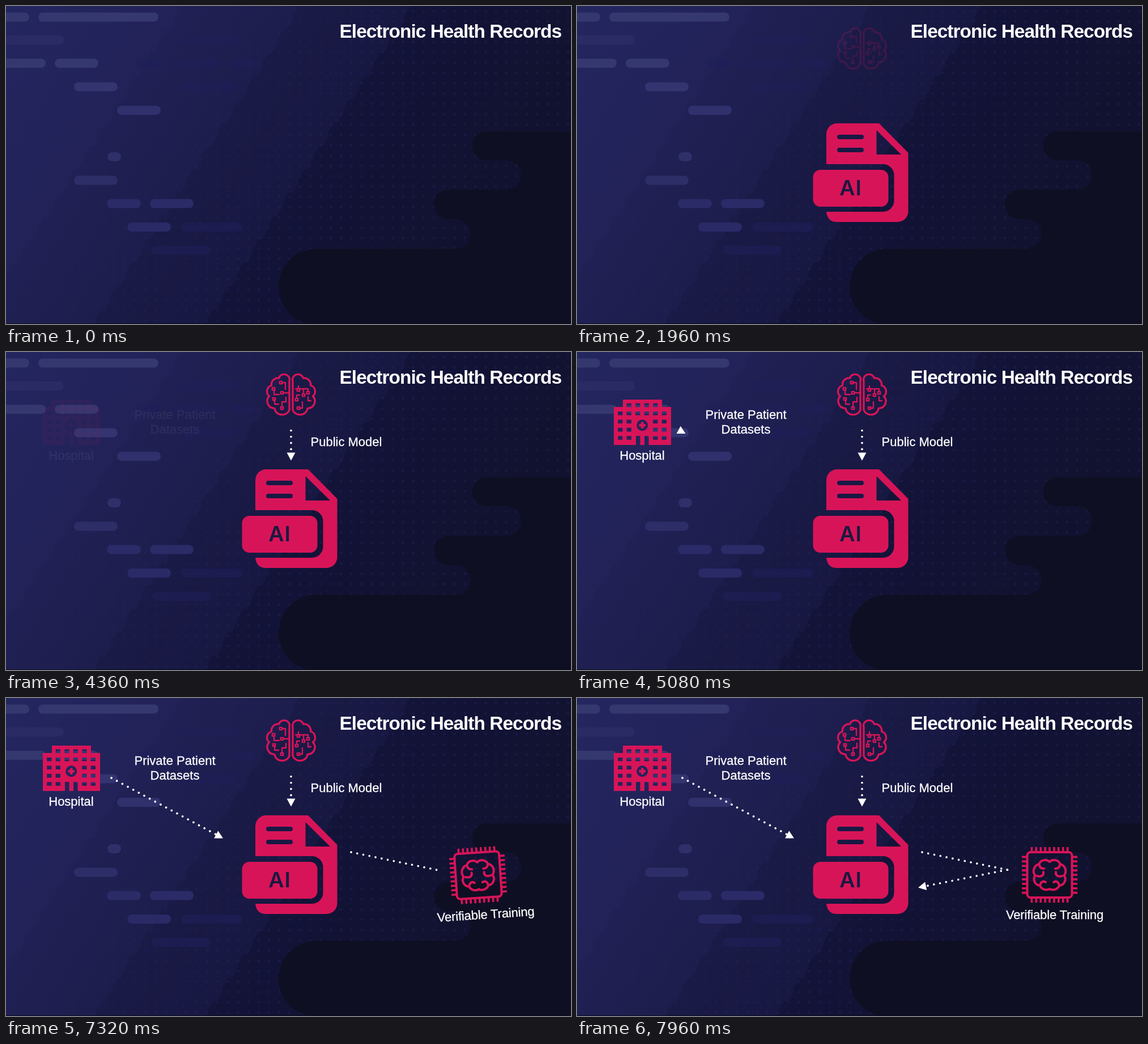
An HTML page that plays this animation: 997x561 px, repeating every 8000 ms.

```html
<!DOCTYPE html>
<html lang="en">
<head>
<meta charset="utf-8">
<title>Electronic Health Records</title>
<style>
  html, body { margin: 0; width: 100%; height: 100%; overflow: hidden; background: #14132f; }
  svg { display: block; width: 100%; height: 100%; }
  text { font-family: "Liberation Sans", Arial, sans-serif; fill: #fff; }
  .label { font-size: 22px; text-anchor: middle; stroke: #fff; stroke-width: .3px; }
  .title { font-size: 33.4px; font-weight: 700; letter-spacing: -.96px; }
  .badge { font: 600 37.5px Inter, sans-serif; fill: #1a1940; text-anchor: middle; letter-spacing: .8px; }
  .solid { fill: #d81458; fill-rule: evenodd; }
  .line { fill: none; stroke: #d81458; stroke-linecap: round; stroke-linejoin: round; }
  .arrow line { stroke: #fff; stroke-width: 3.7; stroke-linecap: round; }
  .arrow path { fill: #fff; }
</style>
</head>
<body>
<svg viewBox="0 0 997 561" preserveAspectRatio="none">
  <defs>
    <linearGradient id="sky" gradientUnits="userSpaceOnUse" x1="0" y1="0" x2="755" y2="490">
      <stop offset="0" stop-color="#242660"/>
      <stop offset=".3" stop-color="#222258"/>
      <stop offset="1" stop-color="#17183d"/>
    </linearGradient>
    <linearGradient id="fade" gradientUnits="userSpaceOnUse" x1="80" y1="50" x2="500" y2="325">
      <stop offset="0" stop-color="#000"/>
      <stop offset="1" stop-color="#fff"/>
    </linearGradient>
    <mask id="dotMask"><rect width="997" height="561" fill="url(#fade)"/></mask>
    <pattern id="dots" width="18.2" height="18.2" patternUnits="userSpaceOnUse">
      <circle cx="9" cy="9" r="2.3" fill="#2c2b68" opacity=".3"/>
    </pattern>
    <path id="lobe" d="M500 51A9.5 9 0 0 0 481.5 46A11.5 11.5 0 0 0 468.5 59A11 11 0 0 0 464.5 78A12.5 12.5 0 0 0 471.5 99L474 99.5A13.3 12 0 0 0 500 102Z"/>
    <path id="fold" d="M834 289A11 10 0 0 0 815.5 293A12.5 12.5 0 0 0 808.5 313A11.5 11.5 0 0 0 817 331A12 11 0 0 0 834 337M812 314C819 316 824 313 823 307M817 331C818 324 823 322 827 325M815.5 293C816 298 819 301 824 301"/>
  </defs>

  <rect width="997" height="561" fill="url(#sky)"/>
  <g id="bands" fill="#080818"></g>
  <rect width="997" height="561" fill="url(#dots)" mask="url(#dotMask)"/>
  <g id="pills"></g>
  <path fill="#0f0f23" d="M997 221H848a25.5 25.5 0 0 0 0 51H883a26 26 0 0 1 0 52H781a26 26 0 0 0 0 52H794a26 26 0 0 1 0 52H548a67 67 0 0 0 0 134H997Z"/>
  <rect y="560" width="997" height="1" fill="#0a0a1c"/>
  <text class="title" x="588.5" y="56">Electronic Health Records</text>

  <g id="file">
    <path class="solid" d="M440 279V226a19 19 0 0 1 19-19H533L584.5 259V362a19 19 0 0 1-19 19H459q-17 0-19-18H540a19.5 19.5 0 0 0 19.5-19.5V298.5A19.5 19.5 0 0 0 540 279ZM528.5 219V262H572ZM463 227h39a4 4 0 0 1 0 8h-39a4 4 0 0 1 0-8ZM463 250h39a4 4 0 0 1 0 8h-39a4 4 0 0 1 0-8Z"/>
    <rect class="solid" x="416.5" y="289" width="133" height="65" rx="13"/>
    <text class="badge" x="483" y="334">AI</text>
  </g>

  <g id="brain" class="line" stroke-width="3.3">
    <use href="#lobe"/>
    <use href="#lobe" transform="matrix(-1 0 0 1 1006 0)"/>
    <g id="circuit" stroke-width="2.3">
      <path d="M488 54H493V66M473 68V75H482M490 72H499M474 84V92H481M487 97V88H494V80M511 65H533V69M525 65V73M516 65V60M513 82V76H518M519 99H523V88M533 79V86H538"/>
    </g>
  </g>
  <text id="modelText" class="label" x="600.5" y="166">Public Model</text>

  <g id="hospital">
    <path id="building" class="solid"/>
    <path class="solid" d="M113 123.5h4.5v3.5h3.5v4.5h-3.5v3.5h-4.5v-3.5h-3.5v-4.5h3.5Z"/>
    <text class="label" x="115" y="190">Hospital</text>
    <text class="label" x="298" y="118">Private Patient</text>
    <text class="label" x="298" y="143.5">Datasets</text>
  </g>

  <g id="chip">
    <g class="line" stroke-width="4">
      <rect x="794.5" y="272" width="79" height="80" rx="6"/>
      <path id="pins" stroke-width="3.6" stroke-linecap="butt"/>
      <use href="#fold"/>
      <use href="#fold" transform="matrix(-1 0 0 1 1668 0)"/>
    </g>
    <text class="label" x="843" y="389.5" letter-spacing="-.15">Verifiable Training</text>
  </g>
  <g id="arrows"></g>
</svg>
<script>
const LOOP = 8000;
const $ = id => document.getElementById(id);
const add = (parent, name, attrs) => {
  const el = document.createElementNS("http://www.w3.org/2000/svg", name);
  for (const key in attrs) el.setAttribute(key, attrs[key]);
  return parent.appendChild(el);
};
const progress = (t, from, to) => Math.min(1, Math.max(0, (t - from) / (to - from)));

// Diagonal shade with a slightly stepped edge
function band(x, opacity) {
  let d = `M997 0H${x}`;
  for (let i = 0; i < 28; i++) {
    const y = i * 20.6;
    d += `L${x - y * .65 + (i % 2 ? 3 : -2)} ${y}l-11 20.6`;
  }
  add($("bands"), "path", { d: d + "L997 580Z", opacity });
}
band(310, .06);
band(518, .1);
band(715, .21);

function pills(y, color, ...spans) {
  for (const [from, to] of spans)
    add($("pills"), "rect", { x: from, y: y - 8, width: to - from, height: 16, rx: 8, fill: color });
}
const faint = "#20205a8c";
pills(19.5, "#35376f", [-20, 41], [57, 269]);
pills(60, "#2a2b65", [-20, 102]);
pills(60, faint, [303, 411]);
pills(101, "#35376f", [-20, 70], [86, 163]);
pills(101, faint, [230, 272], [289, 379], [396, 440]);
pills(142.5, "#333470", [120, 197]);
pills(142.5, faint, [309, 407]);
pills(184, "#30316c", [196, 273]);
pills(266, "#2f306a", [179, 203]);
pills(307.5, "#2d2e68", [120, 197]);
pills(348.5, "#2b2b68", [178, 238], [254, 331]);
pills(390, "#2a2a67", [214, 291]);
pills(390, faint, [309, 417]);
pills(431, faint, [257, 361]);

// Circuit nodes
const nodes = [[485, 54], [472, 65], [487, 72], [473, 83], [487, 99],
  [516, 67], [525, 76], [533, 72], [513, 84], [516, 99]];
for (const [x, y] of nodes)
  add($("circuit"), "rect", { x: x - 2.2, y: y - 2.2, width: 4.4, height: 4.4 });

// Hospital walls with open windows, emblem and doors
let walls = "M81 84H150V97H166V164H65V97H81ZM105.2 129.2a10 10 0 0 1 20 0a10 10 0 0 1-20 0ZM104 148h7.5v16h-7.5ZM119 148h7.5v16h-7.5Z";
for (let row = 0; row < 5; row++)
  for (let col = 0; col < 6; col++) {
    const wing = col === 0 || col === 5;
    const middle = col === 2 || col === 3;
    if (row === 0 ? !wing : row === 1 || !middle)
      walls += `M${72.2 + col * 15.5} ${90.6 + row * 14.4}h8.2v6.6h-8.2Z`;
  }
$("building").setAttribute("d", walls);

let pins = "";
for (let i = -4; i <= 4; i++) {
  const x = 834 + i * 7.9, y = 312 + i * 7.9;
  pins += `M${x} 263v9M${x} 352v9M785 ${y}h9M874 ${y}h9`;
}
$("pins").setAttribute("d", pins);

const HEAD = 14;
function arrow(x1, y1, x2, y2, hasHead = true) {
  const length = Math.hypot(x2 - x1, y2 - y1);
  const angle = Math.atan2(y2 - y1, x2 - x1) * 180 / Math.PI;
  const g = add($("arrows"), "g", { class: "arrow", transform: `translate(${x1} ${y1}) rotate(${angle})` });
  const line = add(g, "line", { "stroke-dasharray": "0 10.98" });
  const head = hasHead && add(g, "path", { d: `M0-7.5L${HEAD} 0L0 7.5Z` });
  return p => {
    const end = hasHead ? -8 + p * (length - HEAD + 8) : p * (length + 1);
    g.style.display = p > 0 ? "" : "none";
    line.style.display = end > 0 ? "" : "none";
    line.setAttribute("x2", Math.max(.01, end));
    if (head) head.setAttribute("transform", `translate(${end} 0)`);
  };
}
const modelArrow = arrow(503, 138.5, 503, 191.5);
const dataArrow = arrow(186, 141, 383, 247.5);
const outArrow = arrow(609, 272, 759, 303, false);
const backArrow = arrow(759, 303, 602, 334.5);

const fade = (id, t, from, to) => $(id).setAttribute("opacity", progress(t, from, to));

function render(t) {
  fade("file", t, 1080, 1680);
  fade("brain", t, 1840, 2480);
  fade("modelText", t, 2640, 3160);
  modelArrow(progress(t, 2640, 3280));
  fade("hospital", t, 4320, 5000);
  dataArrow(progress(t, 5080, 5800));
  fade("chip", t, 5880, 6480);
  outArrow(progress(t, 6640, 7240));
  const tilt = -4.7 * Math.sin(progress(t, 7270, 7960) * 4 * Math.PI);
  $("chip").setAttribute("transform", `rotate(${tilt} 843 328)`);
  backArrow(progress(t, 7330, 7960));
}

function tick() {
  render(performance.now() % LOOP);
  requestAnimationFrame(tick);
}
tick();
</script>
</body>
</html>
```
